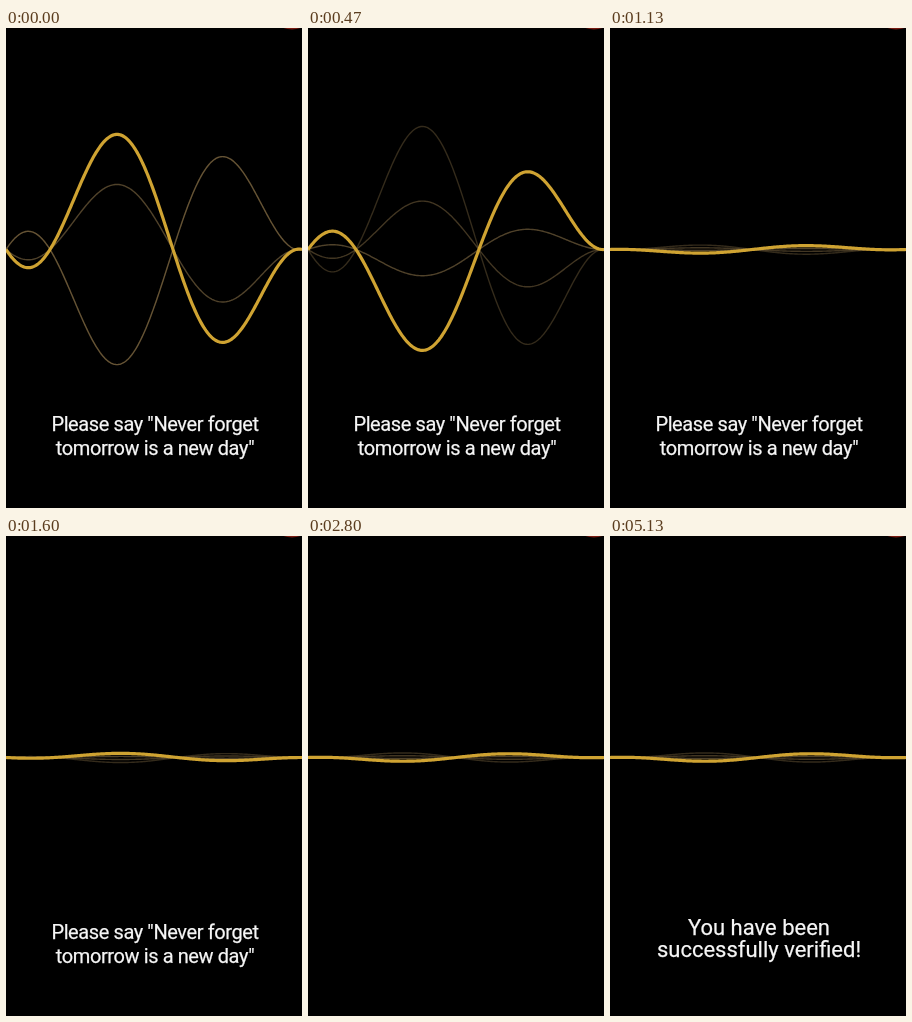
An HTML page with a canvas that plays this animation: 296 px wide and 480 px high, repeating every 5.27 s.

```html
<!DOCTYPE html>
<html lang="en">
<head>
<meta charset="utf-8">
<title>Voice check</title>
<style>
  html, body { margin: 0; width: 100%; height: 100%; overflow: hidden; background: #000; }
  #stage { position: relative; width: 296px; height: 480px; overflow: hidden; }
  canvas { position: absolute; left: 0; top: 0; }
  p {
    position: absolute; left: 0; width: 298px; margin: 0;
    text-align: center; white-space: nowrap; color: #f6f6f6;
    font-family: Roboto, "Open Sans", sans-serif;
    -webkit-text-stroke: 0.25px #f6f6f6;
  }
  #ask { top: 384px; font-size: 20px; line-height: 24px; letter-spacing: -0.4px; }
  #done { top: 381px; font-size: 22px; line-height: 22px; }
</style>
</head>
<body>
<div id="stage">
  <canvas id="view" width="296" height="480"></canvas>
  <p id="ask">Please say "Never forget<br>tomorrow is a new day"</p>
  <p id="done">You have been<br>successfully verified!</p>
</div>
<script>
const W = 296, H = 480, MID = W / 2, AXIS = 221.5, HALF = 123;
const LOOP = 5270, STEP = 200 / 3;
const ASK_END = 2660, DONE_START = 3660;
const IDLE = 4.4, SPREAD = 0.74;
const OPENING = [0.565, -1, -1];   // echo heights before they fan out evenly

const ctx = document.getElementById('view').getContext('2d');
const ask = document.getElementById('ask');
const done = document.getElementById('done');

const ramp = (t, from, to) => Math.min(1, Math.max(0, (t - from) / (to - from)));
const mix = (a, b, k) => a + (b - a) * k;

// The wave glides right, a little faster after the first half second, then freezes.
function travel(t) {
  const run = Math.min(t, ASK_END);
  return 44 + 0.272 * run + 0.054 * Math.max(0, run - 467);
}

function loudness(t) {
  return mix(124 - 0.036 * t, IDLE, ramp(t, 600, 1000));
}

function wave(amp, shift, color, width) {
  ctx.beginPath();
  for (let x = 0; x <= W; x++) {
    const bell = 1 - ((x - MID) / MID) ** 2;
    ctx.lineTo(x, AXIS - bell * amp * Math.sin(Math.PI * (x - shift) / HALF));
  }
  ctx.strokeStyle = color;
  ctx.lineWidth = width;
  ctx.stroke();
}

function draw(time) {
  const t = Math.floor((time + 4) / STEP) * STEP;
  const shift = travel(t), amp = loudness(t), fan = ramp(t, 0, 200);

  ctx.fillStyle = '#000';
  ctx.fillRect(0, 0, W, H);
  ctx.fillStyle = '#781a10';
  ctx.beginPath();
  ctx.arc(286, -23.5, 25, 0, 2 * Math.PI);
  ctx.fill();

  OPENING.forEach((first, i) => {
    const ratio = mix(first, 1 - SPREAD * (i + 1), fan);
    wave(amp * ratio, shift, `rgba(200, 165, 105, ${0.4 - 0.07 * i})`, 1.4);
  });
  wave(amp, shift, '#cfa332', 3.2);

  ask.style.visibility = t < ASK_END ? 'visible' : 'hidden';
  done.style.visibility = t >= DONE_START ? 'visible' : 'hidden';
}

let start;
function tick(now) {
  if (start === undefined) start = now;
  draw((now - start) % LOOP);
  requestAnimationFrame(tick);
}
draw(0);
requestAnimationFrame(tick);
</script>
</body>
</html>
```
